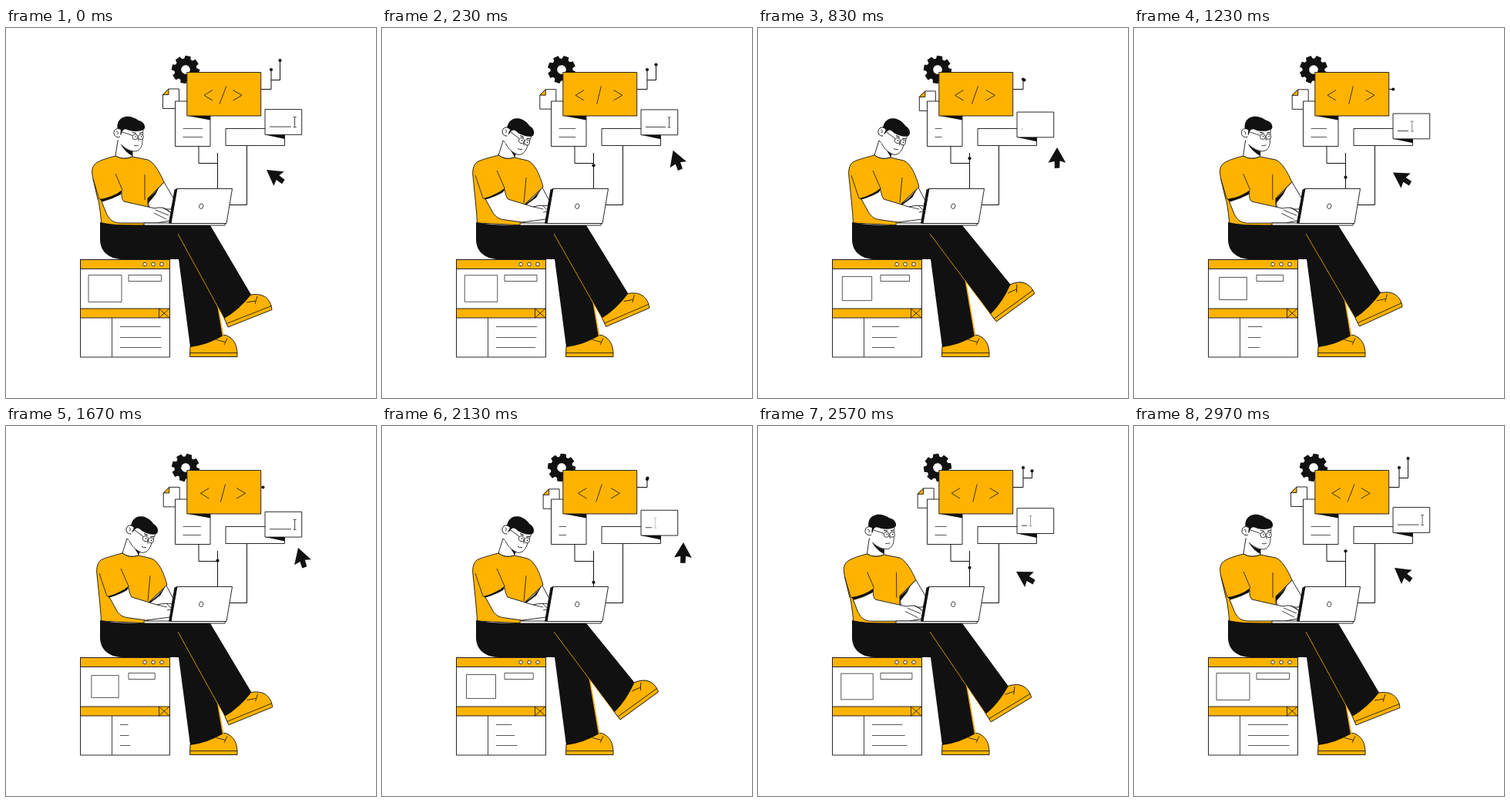
These frames come from a looping animation (480x480 px, 3000 ms). An HTML page with a canvas:

```html
<!DOCTYPE html>
<html lang="en">
<head>
<meta charset="utf-8">
<title>Developer at work</title>
<style>
html, body { margin: 0; width: 100%; height: 100%; overflow: hidden; background: #fff; }
canvas { display: block; width: 480px; height: 480px; }
</style>
</head>
<body>
<canvas id="stage" width="480" height="480"></canvas>
<script>
const ctx = document.getElementById('stage').getContext('2d');
const LOOP = 3000, HALF = 1500, QUARTER = 750;
const INK = '#111', GOLD = '#ffb300', WHITE = '#fff';
const RAD = Math.PI / 180;

const lerp = (a, b, k) => a + (b - a) * k;
const smooth = k => k * k * (3 - 2 * k);
// 0 at the start of the period, 1 in the middle
const swing = (t, period, lag = 0) => (1 - Math.cos(t / period * 2 * Math.PI - lag * RAD)) / 2;

// keys: [time, ...values], eased from key to key
function track(t, keys) {
  let i = 1;
  while (i < keys.length - 1 && t > keys[i][0]) i++;
  const a = keys[i - 1], b = keys[i];
  const u = Math.min(1, Math.max(0, (t - a[0]) / (b[0] - a[0])));
  const e = (1 - Math.cos(Math.PI * u)) / 2;
  return a.slice(1).map((v, j) => lerp(v, b[j + 1], e));
}

// blends two path strings of the same structure
function morph(a, b, k) {
  const nums = b.match(/-?[\d.]+/g);
  let i = 0;
  return a.replace(/-?[\d.]+/g, v => lerp(+v, +nums[i++], k).toFixed(3));
}

function shape(d, fill, stroke = INK, width = 0.9) {
  const p = new Path2D(d);
  if (fill) { ctx.fillStyle = fill; ctx.fill(p); }
  if (stroke) { ctx.strokeStyle = stroke; ctx.lineWidth = width; ctx.stroke(p); }
}
const line = (d, color = INK, width = 0.8) => shape(d, null, color, width);
const rect = (x1, y1, x2, y2, fill = WHITE, width = 0.9) =>
  shape(`M${x1} ${y1}H${x2}V${y2}H${x1}Z`, fill, INK, width);

function disc(x, y, r, fill, stroke) {
  ctx.beginPath();
  ctx.arc(x, y, r, 0, 2 * Math.PI);
  if (fill) { ctx.fillStyle = fill; ctx.fill(); }
  if (stroke) { ctx.strokeStyle = stroke; ctx.lineWidth = 0.8; ctx.stroke(); }
}

function gear(turn) {
  ctx.save();
  ctx.translate(233, 54);
  ctx.rotate(turn);
  ctx.beginPath();
  for (let i = 0; i < 8; i++) {
    for (const [deg, r] of [[-17, 14.5], [-11, 18.3], [11, 18.3], [17, 14.5]]) {
      const a = (i * 45 + deg) * RAD;
      ctx.lineTo(r * Math.cos(a), r * Math.sin(a));
    }
  }
  ctx.closePath();
  ctx.fillStyle = INK;
  ctx.fill();
  disc(0, 0, 5.8, WHITE);
  ctx.restore();
}

// polyline cut at a given length, with a dot at its end
function wire(points, length) {
  if (length <= 0) return;
  let [x, y] = points[0], left = length;
  let d = `M${x} ${y}`;
  for (const [px, py] of points.slice(1)) {
    const span = Math.hypot(px - x, py - y);
    const k = Math.min(1, left / span);
    x = lerp(x, px, k);
    y = lerp(y, py, k);
    d += `L${x} ${y}`;
    left -= span;
    if (left <= 0) break;
  }
  line(d, INK, 1);
  disc(x, y, 2.1, INK);
}

function seat(t) {
  const s = swing(t, LOOP);
  rect(96.5, 300.5, 212.5, 427);
  rect(96.5, 300.5, 212.5, 312.5, GOLD);
  for (const x of [180, 191, 202]) disc(x, 306.5, 2.3, WHITE, INK);
  rect(96.5, 364, 212.5, 376, GOLD);
  line('M198.5 364V376M198.5 364L212 376M212 364L198.5 376M137.5 376V427');
  const w = lerp(21.5, 17.5, s), h = lerp(17.4, 14.3, s);
  rect(128.5 - w, 338 - h, 128.5 + w, 338 + h, null, 0.7);
  rect(159, 320.5, lerp(201.5, 193, s), 328.5, null, 0.7);
  [387.5, 401.5, 414.5].forEach((y, i) => {
    const end = lerp(201.5, 158.5 + i * 0.7, swing(t, LOOP, 18 - 9 * i));
    line(`M148 ${y}H${end}`, INK, 0.7);
  });
}

function panels(t) {
  const slow = swing(t, LOOP), mid = swing(t, HALF);

  gear(10 * RAD + mid * 45 * RAD);

  ctx.save();
  ctx.translate(6 * mid, 3 * mid);
  shape('M203.5 86.5L211 79H224.5V104.5H203.5Z', WHITE);
  shape('M203.5 86.5L211 79V86.5Z', GOLD);
  ctx.restore();

  // links
  line('M250 153V175.5H274.5M274.5 162V208M312.5 152V229.5H289', INK, 1);
  if (t >= 30) disc(274.5, 162 + 46 * ((t + 35) % QUARTER) / QUARTER, 2.1, INK);
  const grown = 1 - slow;
  wire([[331, 79.5], [344, 79.5], [344, 54]], 0.5 + 61 * grown);
  wire([[344, 67.5], [355.5, 67.5], [355.5, 41.5]], 40 * grown ** 2.5 - 3);

  // document
  rect(219.5, 95, 265, 153.5);
  const textEnd = lerp(255, 238, mid);
  line(`M229.5 130.5H${textEnd}M229.5 141.5H${textEnd}`, INK, 0.7);
  shape('M236 114H265V119.5Z', INK, null);

  // code card
  rect(234.8, 57.5, 330.7, 114, GOLD);
  const [open] = track(t % QUARTER, [[0, 0], [250, 1], [480, 1], [750, 0]]);
  const d = 6 * open, tilt = 1.8 * open;
  line(`M${268 - d} 80.5L${257 - d} 87.3L${268 - d} 94` +
    `M${286 - tilt} 75.5L${277 + tilt} 98.5` +
    `M${294.5 + d} 80.5L${306 + d} 87.3L${294.5 + d} 94`, INK, 0.8);

  // input card
  rect(285, 130.5, 361.5, 152.5);
  const y = 105.6 + 5.9 * slow, bottom = y + 32.8;
  shape(`M336 ${bottom}H361.7V${bottom + 5.5}Z`, INK, null);
  rect(336, y, 383.7, bottom);
  const [end, ink] = track(t % HALF, [
    [0, 370, 1], [170, 370, 1], [430, 354, 0.4], [630, 350, 0.3],
    [830, 342.6, 0], [1070, 349, 0.55], [1470, 369.5, 0.85], [1500, 370, 1]
  ]);
  line(`M342 ${y + 22.5}H${end}`, INK, 0.8);
  ctx.globalAlpha = ink;
  const cx = end + 4.6;
  line(`M${cx} ${y + 10.5}V${y + 22.5}M${cx - 2} ${y + 10}H${cx + 2}M${cx - 2} ${y + 23}H${cx + 2}`);
  ctx.globalAlpha = 1;
}

function pointer(t) {
  const [x, y, deg] = track(t % HALF, [
    [0, 338, 184, -53], [170, 379, 158, -16.5], [430, 368, 163, -35],
    [630, 391, 151, 3], [830, 388, 155, 1.5], [1070, 335, 189, -58], [1500, 338, 184, -52]
  ]);
  ctx.save();
  ctx.translate(x, y);
  ctx.rotate(deg * RAD);
  shape('M0 0L11.8 19.5L4 17.5L4 26.5L-2.5 27L-2.8 18L-11 20Z', INK, null);
  ctx.restore();
}

function head(k) {
  ctx.save();
  ctx.translate(144 + 16 * k, 136 - 2 * k);
  ctx.rotate(17.5 * k * RAD);
  ctx.translate(-144, -136);
  shape('M147 128L146 147C152 155 160 160 168 160C175 159 177 152 177 146L178 130Z', WHITE, null);
  line('M149 151C154 156 161 160 168 160C175 159 177 152 177 146L178 131');
  shape('M146 137C142 126 145 117 155 115C162 114 168 117 172 120C177 121 181 125 180 130' +
    'C178 134 168 135 160 133C156 131 153 130 151 134L149 139Z', INK, null);
  shape('M149 132C145 129 140 131 140 136C140 140 144 143 148 141', WHITE);
  line('M143 134Q146 134 145 138');
  line('M151 135L164 139.5M166 152.5Q169 153.5 172 152M171 143L172.5 146.5');
  line('M164 135.5L169 136.5M173 136.5L177 135.5', INK, 1.1);
  for (const x of [167.5, 175]) {
    disc(x, 141.3, 3.4, WHITE, INK);
    disc(x + 0.6, 141, 0.8, INK);
  }
  ctx.restore();
}

function torso(k) {
  const part = (a, b, ...style) => shape(morph(a, b, k), ...style);
  // far arm
  part('M205 200L218 222L214 235L186 235L184 222Z',
       'M208 207L217 224L214 235L190 235L185 229Z', WHITE);
  part('M183 222C190 217 195 212 199 206L194 216L184 228Z',
       'M184 229C192 225 200 217 207 208L200 220L185 231Z', INK, null);
  part('M145 146L142 166Q152 172 164 167L164 154Z',
       'M157 146L151 165Q160 172 172 168L173 160Z', WHITE);
  part('M142 166C130 169 118 173 115 177C111 181 111 187 113 196L119 222L120 224' +
       'C122 235 123 245 124 256L184 256L184 221L205 200C200 188 192 174 184 171L164 167Q152 172 142 166Z',
       'M151 165C140 168 128 171 123 174C118 178 117 186 118 193L120 212L121 222' +
       'C122 233 123 243 123.5 253L184 256L185 229L209 206C205 192 199 176 189 172L172 168Q160 172 151 165Z', GOLD);
  part('M149 151C154 156 159 159 164 160L164 166C158 163 152 157 149 151Z',
       'M166 155C168 159 171 162 174 163L172 167C170 164 167 160 166 155Z', INK, null);
  head(k);
  // near arm
  part('M124 225L150 213C150 219 150 222 153 225L193 234C203 231 210 235 214 240' +
       'L212 250L196 253L148 253C138 253 133 247 130 240Z',
       'M134 222L159 210C160 215 161 219 163 222L196 232C203 230 211 230 216 231' +
       'L213 248L182 252L160 249C150 248 147 244 144 240Z', WHITE);
  part('M121 222Q138 220 151 210L149 216Q138 222 125 225.5Z',
       'M131 221Q147 218 160 207L157 213Q147 219 134 222.5Z', INK, null);
  part('M113 196L121 222M142 189L151 210M180 190L180 223',
       'M121 191L131 221M149 185L159 208M187 194L184 227', null, INK, 0.8);
  part('M194 236L211 243M192 240L208 248M203 233L213 239',
       'M196 232L209 235M208 230L214 236M209 239L214 238', null, INK, 0.8);
}

function legs(t) {
  const turn = -14.7 * RAD * smooth(swing(t, HALF));
  const c = Math.cos(turn), s = Math.sin(turn);
  const px = 271, py = 302;
  const spin = (x, y) =>
    `${px + (x - px) * c - (y - py) * s} ${py + (x - px) * s + (y - py) * c}`;

  // planted foot and leg
  shape('M239 413L238.5 426.5H300C300.5 416 298 406 290 401Q286 398 281 398Z', GOLD);
  line('M238.5 421.5H300M273 404.5L285 407.5M287 402.5L283 411');
  shape('M222 262L224 300L239 414Q262 411 282 399L263 290Z', INK, null);
  line('M266 308L281.5 399', GOLD, 1.5);

  // crossed leg
  ctx.save();
  ctx.translate(px, py);
  ctx.rotate(turn);
  ctx.translate(-px, -py);
  shape('M282 374L288 388L345 365.5C344 356 339 348 329 346Q323 345 317 346Z', GOLD);
  line('M286 383.5L344.5 360.5M312 356L324 354M326 348L323 358');
  ctx.restore();
  shape(`M122 252Q146 257 184 255.5L265 256L${spin(318, 346)}Q${spin(302, 366)} ${spin(283, 377)}` +
    'L223 267L240 300H150C132 299 122 289 122 274Z', INK, null);
  line(`M223 267L${spin(283, 377)}`, GOLD, 0.8);
}

function laptop() {
  shape('M179 253H284.5L284 256H179Z', WHITE);
  shape('M221.5 208.5L293.5 208.5L286 253.5L213.5 253.5Z', WHITE);
  shape('M218.5 209.5L222.5 208L214.5 253.5H211Z', INK, null);
  ctx.save();
  ctx.translate(253.3, 231.2);
  ctx.rotate(0.3);
  ctx.scale(0.8, 1);
  disc(0, 0, 3.3, null, INK);
  ctx.restore();
}

function draw(t) {
  ctx.fillStyle = WHITE;
  ctx.fillRect(0, 0, 480, 480);
  ctx.lineJoin = 'round';
  const [lean] = track(t % HALF, [
    [0, 0], [150, 1], [430, 1.06], [630, 1], [850, 1], [1060, -0.06], [1470, 0], [1500, 0]
  ]);
  panels(t);
  seat(t);
  torso(lean);
  legs(t);
  laptop();
  pointer(t);
}

const start = performance.now();
function frame() {
  draw((performance.now() - start) % LOOP);
  requestAnimationFrame(frame);
}
frame();
</script>
</body>
</html>
```
